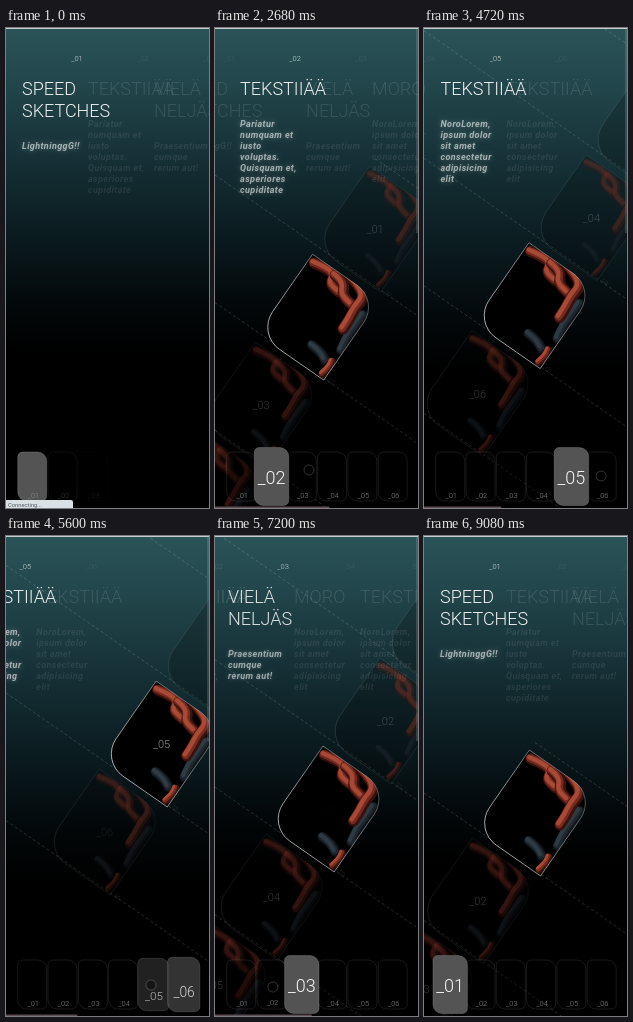
Recreate the animation shown at these times as an HTML page with a canvas. Size 203 px wide and 480 px high, loop 9120 ms.

```html
<!DOCTYPE html>
<html lang="fi">
<head>
<meta charset="utf-8">
<title>Speed sketches</title>
<style>
html, body { margin: 0; width: 100%; height: 100%; overflow: hidden; background: #000; }
canvas { display: block; width: 203px; height: 480px; }
</style>
</head>
<body>
<canvas id="stage"></canvas>
<script>
const W = 203, H = 480, LOOP = 9120;
const canvas = document.getElementById('stage');
const ctx = canvas.getContext('2d');
const dpr = window.devicePixelRatio || 1;
canvas.width = W * dpr;
canvas.height = H * dpr;

const lorem = ['NoroLorem,', 'ipsum dolor', 'sit amet', 'consectetur', 'adipisicing', 'elit'];
const slides = [
  { title: ['SPEED', 'SKETCHES'], body: ['LightninggG!!'] },
  { title: ['TEKSTIIÄÄ'], body: ['Pariatur', 'numquam et', 'iusto', 'voluptas.', 'Quisquam et,', 'asperiores', 'cupiditate'] },
  { title: ['VIELÄ', 'NELJÄS'], body: ['Praesentium', 'cumque', 'rerum aut!'] },
  { title: ['MORO'], body: lorem },
  { title: ['TEKSTIIÄÄ'], body: lorem },
  { title: ['TEKSTIIÄÄ'], body: lorem }
];

// Click time and step direction
const clicks = [[2220, 1], [2850, 1], [3470, 1], [4150, 1], [4780, 1],
  [5420, -1], [5930, -1], [6680, -1], [7180, -1], [7900, -1]];
// Pointer path: time, x, y
const pointerPath = [[1880, 36, 440], [2240, 60, 446], [2680, 94, 442], [3000, 90, 446],
  [3470, 118, 448], [3880, 156, 446], [4200, 152, 447], [4780, 178, 448], [5300, 146, 449],
  [5620, 145, 449], [5930, 118, 450], [6600, 87, 450], [7180, 58, 451], [7800, 28, 452], [8400, 26, 452]];

const SLOPE = 0.695;
const TILT = Math.atan(SLOPE);
const CARD = { x: 111, y: 277, w: 81, h: 97, r: 27, dx: 57, dy: -88 };

// Smoke strands around the card centre
const strands = {
  red: [
    [[-4, -54], [8, -49], [17, -42], [12, -33], [21, -25]],
    [[17, -42], [27, -34], [24, -22], [33, -13]],
    [[31, -42], [41, -31], [46, -19], [37, -9], [31, 3], [25, 12]]
  ],
  blue: [
    [[45, -2], [36, 11], [29, 20], [23, 33]],
    [[-6, 28], [2, 34], [7, 43]]
  ],
  ember: [[[4, 57], [11, 51], [14, 44]]]
};

const clamp = v => Math.max(0, Math.min(1, v));
const smooth = v => { v = clamp(v); return v * v * (3 - 2 * v); };
const mix = (a, b, k) => a + (b - a) * k;
const label = i => '_0' + (i + 1);
const track = (t, duration) =>
  clicks.reduce((sum, [start, dir]) => sum + dir * smooth((t - start) / duration), 0);
const weight = (i, position) => clamp(1 - Math.abs(i - position));
const white = a => `rgba(255,255,255,${a})`;

function font(style, size) {
  ctx.font = `${style} ${size}px Roboto, Inter, sans-serif`;
}

function write(text, x, y, color, align = 'left', spacing = 0) {
  ctx.letterSpacing = spacing + 'px';
  ctx.textAlign = align;
  ctx.fillStyle = color;
  ctx.fillText(text, x, y);
}

function drawBackground(pos) {
  const reach = 325 + 20 * smooth((pos - 2.5) / 2);
  const g = ctx.createLinearGradient(0, 0, 0, reach);
  g.addColorStop(0, '#2b5458');
  g.addColorStop(0.18, '#21454a');
  g.addColorStop(0.4, '#153036');
  g.addColorStop(0.65, '#0a1a1e');
  g.addColorStop(0.85, '#03080a');
  g.addColorStop(1, '#000');
  ctx.fillStyle = g;
  ctx.fillRect(0, 0, W, H);
}

// A soft tube, lit from the upper left
function drawStrand(points, width, shades) {
  shades.forEach((shade, n) => {
    ctx.save();
    ctx.translate(-n * 0.9, -n * 0.9);
    ctx.beginPath();
    ctx.moveTo(...points[0]);
    for (let j = 1; j < points.length - 1; j++) {
      const [x, y] = points[j], [nx, ny] = points[j + 1];
      ctx.quadraticCurveTo(x, y, (x + nx) / 2, (y + ny) / 2);
    }
    ctx.lineTo(...points.at(-1));
    ctx.strokeStyle = shade;
    ctx.lineWidth = width * (1 - n * 0.3);
    ctx.stroke();
    ctx.restore();
  });
}

function drawSmoke(t) {
  const base = ctx.globalAlpha;
  const red = ['#3a120d', '#752b1f', '#a84a36'];
  ctx.lineCap = ctx.lineJoin = 'round';
  ctx.globalAlpha = base * (1 - Math.exp(-(((t - 3880) / 350) ** 2)));
  strands.blue.forEach(s => drawStrand(s, 10, ['#10171b', '#1e282e', '#2f3b43']));
  strands.ember.forEach(s => drawStrand(s, 7, red));
  ctx.globalAlpha = base;
  strands.red.forEach(s => drawStrand(s, 11, red));
}

function cardPath() {
  ctx.beginPath();
  ctx.roundRect(-CARD.w / 2, -CARD.h / 2, CARD.w, CARD.h, [0, CARD.r, 0, CARD.r]);
}

function drawCard(i, pos, active, t, reveal) {
  const off = pos - i;
  const x = CARD.x + off * CARD.dx, y = CARD.y + off * CARD.dy;
  if (y < -80 || y > 560) return;
  const shown = i === 0 ? reveal : smooth((t - 1500) / 500);
  ctx.save();
  ctx.translate(x, y);
  ctx.rotate(TILT);
  cardPath();
  ctx.globalAlpha = shown * mix(0.2, 1, active);
  ctx.fillStyle = '#000';
  ctx.fill();
  ctx.save();
  ctx.clip();
  ctx.rotate(-TILT);
  ctx.globalAlpha = shown * mix(0.17, 1, active);
  drawSmoke(t);
  ctx.restore();
  const edge = ctx.createLinearGradient(CARD.w / 2, -CARD.h / 2, -CARD.w / 4, CARD.h / 2);
  edge.addColorStop(0, white(0.3));
  edge.addColorStop(1, white(0.75));
  ctx.globalAlpha = shown * mix(0.14, 1, active);
  ctx.strokeStyle = edge;
  ctx.lineWidth = 0.8;
  cardPath();
  ctx.stroke();
  ctx.globalAlpha = shown;
  font('300', 6);
  write(label(i).slice(1), CARD.w / 2 + 4, CARD.h / 2 - 1, white(0.15));
  ctx.restore();

  const settled = weight(i, track(t, 420));
  const alpha = mix(0.22, 0, settled) + 2 * active * settled * (1 - settled);
  ctx.globalAlpha = shown;
  font('300', 11);
  write(label(i), x, y + 4, white(alpha), 'center');
  ctx.globalAlpha = 1;
}

function drawDashes(pos, t) {
  ctx.globalAlpha = smooth((t - 1850) / 300);
  ctx.strokeStyle = white(0.2);
  ctx.lineWidth = 0.8;
  ctx.setLineDash([3, 2.5]);
  for (let i = -1; i < 6; i++) {
    const y = 257 + (CARD.dx * SLOPE - CARD.dy) * (i - pos);
    const x = i < 0 ? CARD.x + pos * CARD.dx : 0;
    ctx.beginPath();
    ctx.moveTo(x, y + x * SLOPE);
    ctx.lineTo(W, y + W * SLOPE);
    ctx.stroke();
  }
  ctx.setLineDash([]);
  ctx.globalAlpha = 1;
}

function drawCopy(i, pos, active) {
  const x = 16 + 66 * (i - pos);
  if (x < -110 || x > W) return;
  const { title, body } = slides[i];
  font('300', 7.5);
  write(label(i), x + 55, 32.5, white(mix(0.1, 0.8, active)), 'center');
  font('300', 18);
  title.forEach((line, n) => write(line, x, 66.5 + 22 * n, white(mix(0.12, 0.92, active))));
  font('italic 600', 9);
  ctx.shadowColor = white(0.45 * active);
  ctx.shadowBlur = 4 * active * dpr;
  const top = 99 + 22 * (title.length - 1);
  body.forEach((line, n) => write(line, x, top + 11 * n, white(mix(0.09, 0.58, active)), 'left', 0.4));
  ctx.shadowBlur = 0;
  ctx.shadowColor = 'transparent';
}

function drawTab(i, active, t) {
  const grow = i === 0 ? active * smooth(t / 240) : active;
  const cx = 26.2 + 30.3 * i, cy = 448.5;
  const w = mix(29, 34.5, grow), h = mix(49, 58, grow);
  ctx.globalAlpha = clamp(1 - 0.4 * i + t / 500);
  ctx.beginPath();
  ctx.roundRect(cx - w / 2, cy - h / 2, w, h, [5, 9, 5, 9]);
  ctx.fillStyle = 'rgba(0,0,0,.35)';
  ctx.fill();
  ctx.fillStyle = `rgba(84,84,84,${active})`;
  ctx.fill();
  ctx.strokeStyle = white(mix(0.12, 0.2, active));
  ctx.lineWidth = 0.8;
  ctx.stroke();
  ctx.globalAlpha = clamp(0.6 - 0.2 * i + t / 800);
  font('300', mix(7.5, 18, grow));
  write(label(i), cx + mix(1, 0, grow), mix(469.5, 456, grow), white(mix(0.55, 0.95, grow)), 'center');
  ctx.globalAlpha = 1;
}

function drawPointer(t) {
  const shown = smooth((t - 1880) / 150) * (1 - smooth((t - 8100) / 300));
  if (!shown) return;
  const n = Math.max(1, pointerPath.findIndex(p => p[0] > t));
  const [a, b] = [pointerPath[n - 1], pointerPath[n]];
  const k = smooth((t - a[0]) / (b[0] - a[0]));
  ctx.beginPath();
  ctx.arc(mix(a[1], b[1], k), mix(a[2], b[2], k), 5, 0, 7);
  ctx.fillStyle = `rgba(0,0,0,${0.35 * shown})`;
  ctx.fill();
  ctx.strokeStyle = white(0.22 * shown);
  ctx.lineWidth = 0.9;
  ctx.stroke();
}

function drawChrome(pos, t) {
  ctx.fillStyle = '#c5cdd0';
  ctx.fillRect(0, 0, W, 1);
  // Scroll bars follow how far the cards overflow the page
  ctx.globalAlpha = clamp(pos * 8);
  ctx.fillStyle = 'rgba(150,172,176,.5)';
  ctx.fillRect(201.5, 1, 1, 204);
  ctx.fillStyle = '#5a4e53';
  ctx.fillRect(0, 478.5, W * W / (312.5 + 55.5 * pos), 1.5);
  ctx.globalAlpha = 1;
  if (t < 80) {
    ctx.fillStyle = '#d9e1e4';
    ctx.beginPath();
    ctx.roundRect(0, 472, 67, 8, [0, 2, 0, 0]);
    ctx.fill();
    font('400', 5.8);
    write('Connecting...', 2, 478.5, '#555b5e');
  }
}

function draw(t) {
  const pos = track(t, 600);
  const textPos = track(t, 120), cardPos = track(t, 180), tabPos = track(t, 420);
  const order = slides.map((_, i) => i);
  const byActive = at => [...order].sort((a, b) => weight(a, at) - weight(b, at));
  ctx.setTransform(dpr, 0, 0, dpr, 0, 0);
  drawBackground(pos);
  const reveal = smooth((t - 960) / 600);
  drawDashes(pos, t);
  byActive(cardPos).forEach(i => drawCard(i, pos, weight(i, cardPos), t, reveal));
  order.forEach(i => drawCopy(i, pos, weight(i, textPos)));
  byActive(tabPos).forEach(i => drawTab(i, weight(i, tabPos), t));
  drawPointer(t);
  drawChrome(pos, t);
}

const begin = performance.now();
function tick() {
  const t = (performance.now() - begin) % LOOP;
  draw(Math.floor(t / 40) * 40);
  requestAnimationFrame(tick);
}
tick();
</script>
</body>
</html>
```
